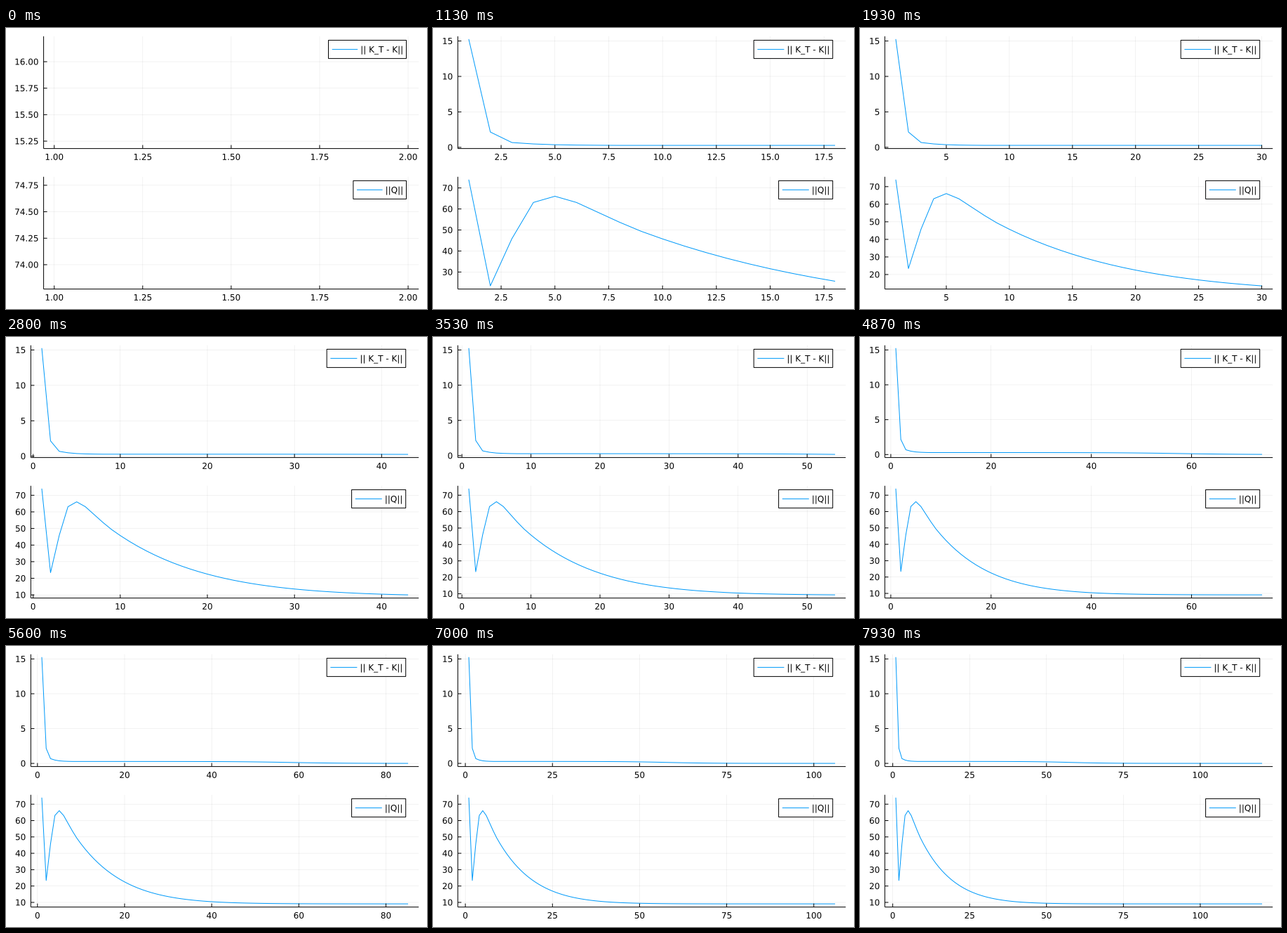
A matplotlib script for the animation above (8000 ms loop, 600 px wide and 400 px high).

```python
import math

import matplotlib.pyplot as plt
import numpy as np
from matplotlib.animation import FuncAnimation
from matplotlib.collections import LineCollection
from matplotlib.patches import PathPatch, Rectangle
from matplotlib.path import Path
from matplotlib.textpath import TextPath

W, H = 600, 400
LOOP, STEP, POINTS = 8000, 20, 120
PX = 0.72  # points per pixel at 100 dpi
FONT = 12
BLUE = "#009AFA"
RIGHT = 588.2
NICE = ((1, 1), (5, 0.9), (2, 0.7), (2.5, 0.5), (3, 0.2))

plt.rcParams["font.family"] = "DejaVu Sans"
plt.rcParams["path.snap"] = False

# Data: a short transient followed by a smooth decay
x = np.arange(1, POINTS + 1)
gain = 0.28 / (1 + np.exp((x - 58) / 6.5))
gain[:7] = 15.21, 2.16, 0.68, 0.48, 0.37, 0.32, 0.295
d = x - 10.0
cost = 9.1 + 36.65 * np.exp(-0.0955 * d - 0.0005 * d * d)
cost[:8] = 73.8, 23.4, 45.84, 63.1, 66.05, 63.1, 58.4, 53.7


def limits(values):
    lo, hi = float(min(values)), float(max(values))
    if hi == lo:
        hi = lo + 1
    pad = 0.03 * (hi - lo)
    return lo - pad, hi + pad


def nice_ticks(lo, hi):
    """Pick 4 to 8 ticks, weighing count, coverage and round steps."""
    span = hi - lo
    top = math.ceil(math.log10(span))
    best, found = -1e9, []
    for z in range(top, top - 3, -1):
        for k in range(4, 17):
            for q, nice in NICE:
                step = q * 10.0 ** z
                if (k - 1) * step >= 2 * span:
                    continue
                r = math.ceil(hi / step - 1e-9) - (k - 1)
                while r * step <= lo:
                    marks = [(r + i) * step for i in range(k)]
                    marks = [m for m in marks if lo <= m <= hi]
                    count = len(marks)
                    if 4 <= count <= 8:
                        score = (0.25 * (1 - abs(count - 5) / 5)
                                 + (r <= 0 and -r < k) / 6
                                 + 0.5 * span / ((count - 1) * step)
                                 + 0.25 * nice)
                        if score > best + 1e-9:
                            best, found = score, marks
                    r += 1
    return found


def labels(marks):
    places = 0
    while any(abs(round(m, places) - m) > 1e-6 for m in marks):
        places += 1
    return [f"{abs(m) if abs(m) < 1e-9 else m:.{places}f}" for m in marks]


outlines = {}


def outline(word, left, baseline):
    """Glyph outlines of a word, placed to a fraction of a pixel."""
    if word not in outlines:
        outlines[word] = TextPath((0, 0), word, size=FONT)
    path = outlines[word]
    return Path(path.vertices * [1, -1] + [left, baseline], path.codes)


def advance(number):
    dots = number.count(".")
    return FONT * (0.636 * (len(number) - dots) + 0.318 * dots)


fig = plt.figure(figsize=(W / 100, H / 100), dpi=100, facecolor="white")
ax = fig.add_axes([0, 0, 1, 1])
ax.set_xlim(0, W)
ax.set_ylim(H, 0)
ax.axis("off")


class Panel:
    def __init__(self, offset, data, name, name_width):
        self.top, self.base = offset + 11.8, offset + 171.6
        self.mid = offset + 30.4
        self.data = data
        self.name, self.name_width = name, name_width
        self.grid = self.segments("black", 0.5, 1, alpha=0.1)
        self.curve, = ax.plot([], [], color=BLUE, lw=PX, zorder=2)
        self.frame = self.segments("black", 1, 3)
        self.box = Rectangle((0, self.mid - 13), 1, 26, fc="white", ec="black",
                             lw=PX, zorder=4)
        ax.add_patch(self.box)
        self.key, = ax.plot([], [], color=BLUE, lw=PX, zorder=5,
                            solid_capstyle="butt")
        self.text = PathPatch(Path([(0, 0)]), fc="black", lw=0, zorder=6)
        ax.add_patch(self.text)

    @staticmethod
    def segments(color, width, z, **style):
        lines = LineCollection([], colors=color, linewidths=width * PX,
                               zorder=z, **style)
        ax.add_collection(lines, autolim=False)
        return lines

    def update(self, n):
        left = 53.6 if n == 1 else 35.4
        xlim, ylim = limits(x[:n]), limits(self.data[:n])

        def px(v):
            return left + (v - xlim[0]) / (xlim[1] - xlim[0]) * (RIGHT - left)

        def py(v):
            return self.base - (v - ylim[0]) / (ylim[1] - ylim[0]) * (self.base - self.top)

        xm, ym = nice_ticks(*xlim), nice_ticks(*ylim)
        xs, ys = [px(m) for m in xm], [py(m) for m in ym]

        self.grid.set_segments(
            [[(u, self.top), (u, self.base)] for u in xs]
            + [[(left, v), (RIGHT, v)] for v in ys])
        self.frame.set_segments(
            [[(left, self.top), (left, self.base)],
             [(left, self.base), (RIGHT, self.base)]]
            + [[(u, self.base), (u, self.base - 5)] for u in xs]
            + [[(left, v), (left + 5, v)] for v in ys])

        self.curve.set_data(px(x[:n]), py(self.data[:n]))
        self.curve.set_visible(n > 1)

        words = [outline(s, u - advance(s) / 2, self.base + 16.2)
                 for s, u in zip(labels(xm), xs)]
        words += [outline(s, left - 7.1 - advance(s), v + 4.4)
                  for s, v in zip(labels(ym), ys)]
        words.append(self.legend(n))
        self.text.set_path(Path.make_compound_path(*words))

    def legend(self, n):
        edge = 570.5 if n == 1 else 569.7
        key = 36.5 if n == 1 else 38
        start = edge - 4.3 - self.name_width
        line = start - 4 - key
        self.key.set_data([line, line + key], [self.mid, self.mid])
        self.box.set_x(line - 5.2)
        self.box.set_width(edge - line + 5.2)
        return outline(self.name, start, self.mid + 4.4)


panels = [Panel(0, gain, "|| K_T - K||", 61), Panel(200, cost, "||Q||", 25.6)]


def draw(frame):
    n = 1 + int((frame * STEP + 14) * POINTS / LOOP)
    for panel in panels:
        panel.update(n)
    return []


anim = FuncAnimation(fig, draw, frames=LOOP // STEP, interval=STEP,
                     init_func=lambda: draw(0), repeat=True, repeat_delay=0,
                     blit=False)
plt.show()
```
